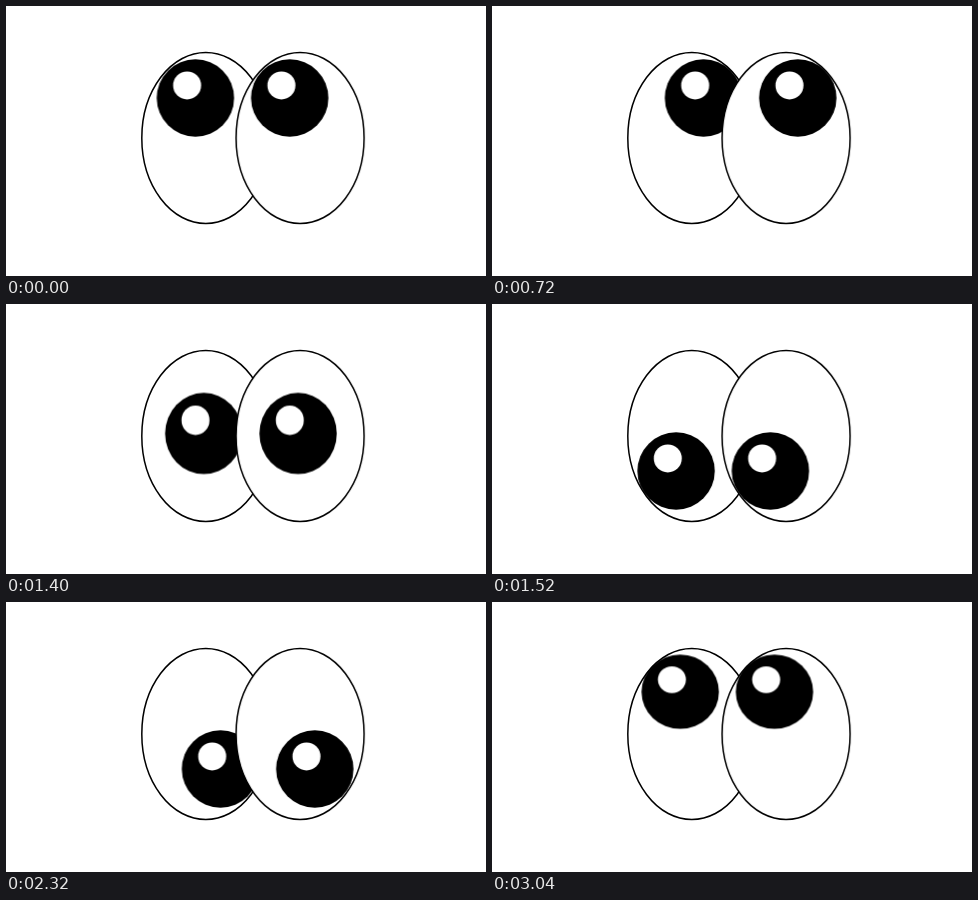
An HTML page that plays this animation: 480x270 px, repeating every 3.12 s.

```html
<!DOCTYPE html>
<html lang="en">
<head>
<meta charset="utf-8">
<title>Looking eyes</title>
<style>
  html, body { margin: 0; width: 100%; height: 100%; overflow: hidden; background: #fff; }
  svg { display: block; width: 480px; height: 270px; }
  .white { fill: #fff; stroke: #000; stroke-width: 1.5; }
  .pupil { animation: look 3120ms step-end infinite; }

  /* Each glance: squash back, stretch across, overshoot, rest. */
  @keyframes look {
    0%      { transform: translate(-10.4px, -40px); }
    16.66%  { transform: translate(-12.4px, -40px) scale(.965, 1); }
    19.23%  { transform: translate(.8px, -40px) scale(1.05, 1); }
    20.51%  { transform: translate(14.2px, -40px) scale(.965, 1); }
    23.07%  { transform: translate(11.7px, -40px); }
    42.30%  { transform: translate(12.4px, -42.4px) scale(1, .96); }
    44.87%  { transform: translate(-2px, -2.5px) scale(1, 1.05); }
    46.15%  { transform: translate(-18.2px, 37.4px) scale(1, .96); }
    48.71%  { transform: translate(-15.7px, 35px); }
    67.94%  { transform: translate(-18px, 35px) scale(.965, 1); }
    70.51%  { transform: translate(-.5px, 35px) scale(1.05, 1); }
    71.79%  { transform: translate(18px, 35px) scale(.965, 1); }
    74.35%  { transform: translate(14.7px, 35px); }
    93.58%  { transform: translate(17.2px, 37.2px) scale(1, .96); }
    96.15%  { transform: translate(2.8px, -2.5px) scale(1, 1.05); }
    97.43%  { transform: translate(-11.6px, -42.2px) scale(1, .96); }
  }
</style>
</head>
<body>
<svg viewBox="0 0 480 270">
  <g transform="translate(199.8 132)">
    <ellipse class="white" rx="64" ry="85.5"/>
    <g class="pupil">
      <circle r="38.7"/>
      <circle cx="-8.3" cy="-12.6" r="14" fill="#fff"/>
    </g>
  </g>
  <g transform="translate(294.1 132)">
    <ellipse class="white" rx="64" ry="85.5"/>
    <g class="pupil">
      <circle r="38.7"/>
      <circle cx="-8.3" cy="-12.6" r="14" fill="#fff"/>
    </g>
  </g>
</svg>
</body>
</html>
```
